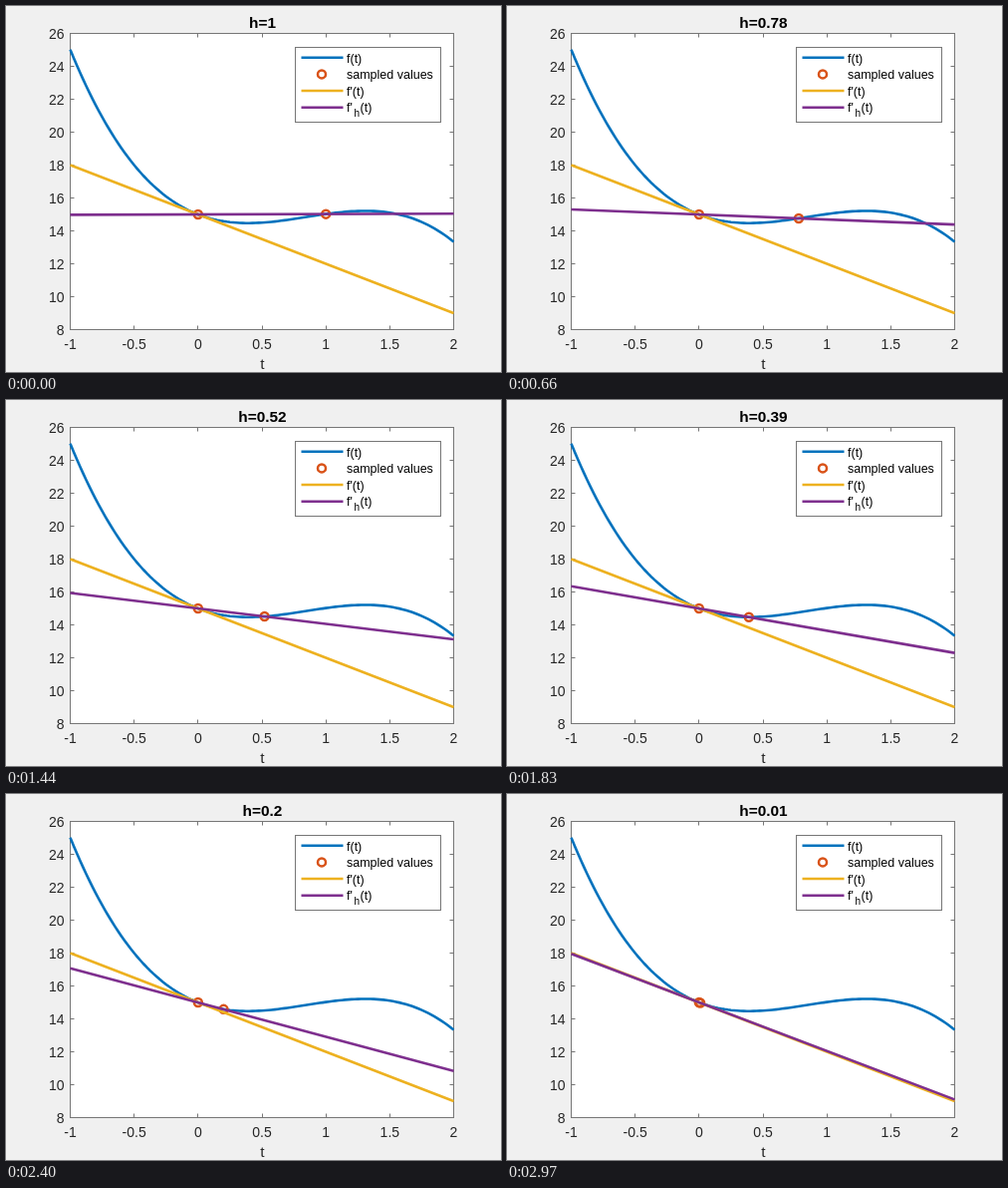
Animation of 497x367 px, one loop 3 s. Source, as an HTML page with a canvas:

```html
<!DOCTYPE html>
<html>
<head>
<meta charset="utf-8">
<style>
html, body { margin: 0; width: 100%; height: 100%; overflow: hidden; background: #f0f0f0; }
canvas { display: block; }
</style>
</head>
<body>
<canvas id="plot" width="497" height="367"></canvas>
<script>
const canvas = document.getElementById('plot');
const ctx = canvas.getContext('2d');
const W = 497, H = 367, ratio = window.devicePixelRatio || 1;
canvas.width = W * ratio;
canvas.height = H * ratio;
canvas.style.width = W + 'px';
canvas.style.height = H + 'px';
ctx.scale(ratio, ratio);

const FONT = '"Liberation Sans", Arial, sans-serif';
const BLUE = '#0072bd', RED = '#d95319', YELLOW = '#edb120', PURPLE = '#7e2f8e';
const LEFT = 64.5, RIGHT = 449.5, TOP = 27.5, BOTTOM = 324.5;

const px = t => LEFT + (t + 1) * (RIGHT - LEFT) / 3;
const py = v => BOTTOM - (v - 8) * (BOTTOM - TOP) / 18;
const f = t => 15 - 3 * t + 5 * t ** 2 - 2 * t ** 3 + t ** 4 / 48;

function text(str, x, y, size, align = 'left', color = '#262626', weight = '') {
  ctx.font = `${weight} ${size}px ${FONT}`;
  ctx.textAlign = align;
  ctx.fillStyle = color;
  ctx.fillText(str, x, y);
}

function path(points, color, width = 2.6) {
  ctx.beginPath();
  points.forEach(([x, y]) => ctx.lineTo(x, y));
  ctx.strokeStyle = color;
  ctx.lineWidth = width;
  ctx.stroke();
}

function box(x, y, w, h) {
  ctx.fillStyle = '#fff';
  ctx.fillRect(x, y, w, h);
  ctx.strokeStyle = '#777';
  ctx.lineWidth = 1;
  ctx.strokeRect(x, y, w, h);
}

function curve(fn, color, steps = 1) {
  const points = [];
  for (let i = 0; i <= steps; i++) {
    const t = -1 + 3 * i / steps;
    points.push([px(t), py(fn(t))]);
  }
  path(points, color);
}

function marker(x, y) {
  ctx.beginPath();
  ctx.arc(x, y, 4, 0, 2 * Math.PI);
  ctx.strokeStyle = RED;
  ctx.lineWidth = 2.5;
  ctx.stroke();
}

function axes() {
  box(LEFT, TOP, RIGHT - LEFT, BOTTOM - TOP);
  for (let t = -1; t <= 2; t += 0.5) {
    const x = Math.floor(px(t)) + 0.5;
    path([[x, BOTTOM], [x, BOTTOM - 4]], '#777', 1);
    path([[x, TOP], [x, TOP + 4]], '#777', 1);
    text(t, px(t), 344, 14, 'center');
  }
  for (let v = 8; v <= 26; v += 2) {
    const y = Math.floor(py(v)) + 0.5;
    path([[LEFT, y], [LEFT + 4, y]], '#777', 1);
    path([[RIGHT, y], [RIGHT - 4, y]], '#777', 1);
    text(v, 58.5, py(v) + 5, 14, 'right');
  }
  text('t', 257.5, 363.5, 15.4, 'center');
}

function legend() {
  box(290.5, 41.5, 146, 75);
  [[51.8, BLUE], [85, YELLOW], [101.8, PURPLE]].forEach(([y, color]) =>
    path([[296.5, y], [338.5, y]], color));
  marker(317, 68.4);
  const label = (str, x, y, size = 12.5) => text(str, x, y, size, 'left', '#000');
  label('f(t)', 342, 56.5);
  label('sampled values', 342, 73);
  label("f'(t)", 342, 89.5);
  label("f'", 342, 105.5);
  label('h', 349.5, 111, 10);
  label('(t)', 355.5, 105.5);
}

function draw(now) {
  const h = (100 - Math.floor(now % 3000 / 30)) / 100;
  const slope = (f(h) - f(0)) / h;
  ctx.fillStyle = '#f0f0f0';
  ctx.fillRect(0, 0, W, H);
  axes();
  curve(f, BLUE, 120);
  marker(px(0), py(f(0)));
  marker(px(h), py(f(h)));
  curve(t => 15 - 3 * t, YELLOW);
  curve(t => 15 + slope * t, PURPLE);
  legend();
  text('h=' + h, 257.5, 21.5, 15.4, 'center', '#000', 'bold');
}

function tick(now) {
  draw(now);
  requestAnimationFrame(tick);
}
draw(0);
requestAnimationFrame(tick);
</script>
</body>
</html>
```
